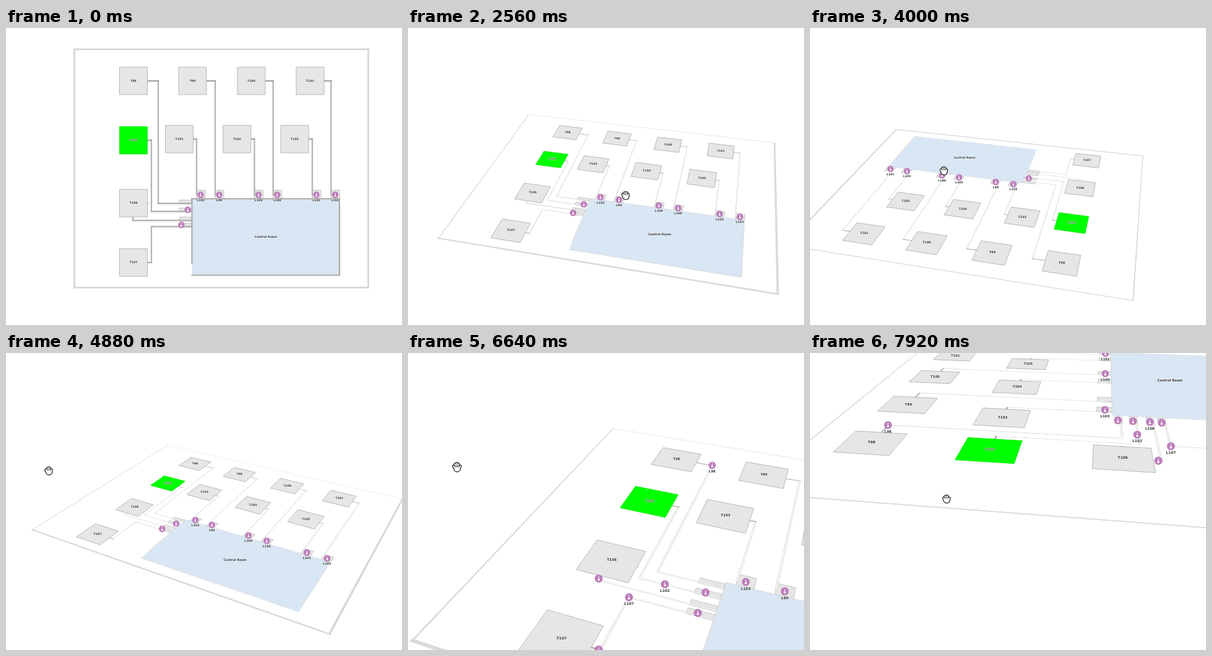
Recreate the animation shown at these times as an HTML page with a canvas. Size 640 by 480 pixels, loop 8 s.

```html
<!DOCTYPE html>
<html lang="en">
<head>
<meta charset="utf-8">
<title>Plan view</title>
<style>
html, body { margin: 0; width: 100%; height: 100%; overflow: hidden; background: #fff; }
canvas { display: block; }
</style>
</head>
<body>
<canvas id="stage" width="640" height="480"></canvas>
<script>
const g = document.getElementById('stage').getContext('2d');
const LOOP = 8000, STEP = 80, FOCAL = 893, MID_X = 320, MID_Y = 262;
const DETAIL = 640; // closer than this, the sensors along the pipes show

const mix = (a, b, k) => a + (b - a) * k;
const grey = v => `rgb(${v},${v},${v})`;

// Layout of the plan
const rooms = [], pipes = [], pads = [], sensors = [];

function addRoom(n, x, y, ...bends) {
  rooms.push({ name: 'T' + n, x, y });
  pipes.push([[x + 22.5, y], ...bends]);
}

function topRoom(n, x, y, bend) {
  addRoom(n, x, y, [bend, y], [bend, 270]);
  pads.push([bend, 262, 14, 14]);
  sensors.push({ label: 'L' + n, x: bend + 6.6, y: 269.5 });
}

function leftRoom(n, y, bend, port) {
  addRoom(n, 206, y, [bend, y], [bend, port], [300, port]);
  pads.push([280, port - 5.5, 20, 6.5]);
  sensors.push({ label: n === 106 ? 'L106' : '', x: 288, y: port - 2.7, port: true });
}

for (let i = 0; i < 3; i++) {
  topRoom(99 + i, 301.5 + 95 * i, 85.5, 338 + 93.7 * i);
  topRoom(103 + i, 280 + 93.3 * i, 179.5, 308 + 93.5 * i);
}
sensors.sort((a, b) => a.label < b.label ? -1 : 1);
for (const [label, x, y] of [['L98', 246, 85], ['L102', 256, 296], ['L107', 235, 321], ['', 205, 309], ['', 234, 379]])
  sensors.push({ label, x, y, detail: true });
leftRoom(102, 181.5, 235, 296.5);
leftRoom(107, 379, 235, 321);
leftRoom(106, 283, 205, 311);
leftRoom(98, 85.5, 246, 283.5);

// Camera and hand at time t, from the drags and the zoom
let cam;
function pose(t) {
  const ramp = (a, b) => Math.min(1, Math.max(0, (t - a) / (b - a)));
  const enter = ramp(80, 800), up = ramp(880, 1250), down = ramp(1250, 1680);
  const tilt = ramp(1840, 2600), turn = ramp(2640, 4880) ** 1.48, settle = ramp(4880, 5360);
  const nudge = ramp(5800, 6160), zoom = 1 - (1 - ramp(6300, 6960)) ** 1.56;
  const reach = ramp(6980, 7160), spin = ramp(7160, 7920);

  const yaw = (14 * tilt + 375.6 * turn + 4.8 * settle - 12.5 * nudge - 103.1 * spin) * Math.PI / 180;
  const pitch = (90 - 57 * tilt - 3 * turn + 3 * settle - 3.25 * spin) * Math.PI / 180;
  cam = {
    x: 320 - 1.2 * down - 211.4 * zoom,
    y: 262 + 11 * up - 24 * down - 38 * zoom ** 0.75,
    dist: mix(FOCAL, 340, zoom),
    c: Math.cos(yaw), s: Math.sin(yaw), pc: Math.cos(pitch), ps: Math.sin(pitch), tilt
  };
  return {
    x: 16 + 345 * enter + 1.5 * down - 11.5 * tilt - 282 * turn + 10 * nudge + 63 * reach + 78.5 * spin,
    y: 22 + 292 * enter - 11 * up + 24 * down - 60 * tilt - 77 * turn - 4 * settle - nudge + 27 * reach + 23.5 * spin,
    open: up === 0 || (nudge === 1 && spin === 0)
  };
}

function project(x, y) {
  const dx = x - cam.x, dy = y - cam.y;
  const u = dx * cam.c - dy * cam.s, v = dx * cam.s + dy * cam.c;
  const k = FOCAL / Math.max(15, cam.dist - v * cam.pc);
  return [MID_X + u * k, MID_Y + v * cam.ps * k, k ** 0.3];
}

function poly(points, fill, edge) {
  g.beginPath();
  for (const p of points) g.lineTo(...project(...p).slice(0, 2));
  g.closePath();
  g.fillStyle = fill;
  g.fill();
  if (edge) { g.strokeStyle = edge; g.lineWidth = 0.7; g.stroke(); }
}

function rect(x, y, w, h, fill, edge) {
  poly([[x, y], [x + w, y], [x + w, y + h], [x, y + h]], fill, edge);
}

// A line of real width lying on the ground
function band(points, width, color) {
  for (let i = 1; i < points.length; i++) {
    const [ax, ay] = points[i - 1], [bx, by] = points[i];
    const half = width / 2 / Math.hypot(bx - ax, by - ay);
    const ex = (bx - ax) * half, ey = (by - ay) * half;
    poly([[ax - ex - ey, ay - ey + ex], [bx + ex - ey, by + ey + ex],
          [bx + ex + ey, by + ey - ex], [ax - ex + ey, ay - ey - ex]], color);
  }
}

function label(text, x, y, k, color = '#333', halo = 'rgba(255,255,255,.6)') {
  g.font = `bold ${4.7 * k}px "DejaVu Sans", sans-serif`;
  g.lineWidth = 1;
  g.strokeStyle = halo;
  g.strokeText(text, x, y);
  g.fillStyle = color;
  g.fillText(text, x, y);
}

function dot(x, y, r, color) {
  g.fillStyle = color;
  g.beginPath();
  g.arc(x, y, r, 0, 7);
  g.fill();
}

// Sensors that would crowd an earlier one are left out
function drawSensors() {
  const shown = [], near = cam.dist < DETAIL;
  for (const s of sensors) {
    if (s.detail && !near) continue;
    const fan = s.port && !near ? (307.5 - s.y) * 0.42 : 0;
    const [x, y, k] = project(s.x + fan, s.y);
    if (shown.some(p => Math.hypot(p[0] - x, p[1] - y) < 18)) continue;
    shown.push([x, y]);
    dot(x, y, 5.2 * k, '#bd7dba');
    g.fillStyle = '#fff';
    g.fillRect(x - 0.5, y - 3 * k, 1, 4 * k);
    dot(x, y + 1.6 * k, 1.4 * k, '#fff');
    label(s.label, x, y + 8.9 * k, k);
  }
}

function drawHand({ x, y, open }) {
  g.save();
  g.translate(x, y);
  g.scale(1.25, 1.25);
  g.lineCap = 'round';
  const reach = open ? 5.4 : 3.6;
  for (const [color, grow] of [['#111', 0.9], ['#fff', 0]]) {
    g.strokeStyle = g.fillStyle = color;
    g.lineWidth = 1.7 + 2 * grow;
    g.beginPath();
    for (let i = -2; i < 3; i++) {
      g.moveTo(i * (open ? 2.3 : 1.9), i * i * (open ? 0.9 : 0.7) - reach);
      g.lineTo(i + 0.4, 2.5);
    }
    g.stroke();
    g.beginPath();
    g.ellipse(0.4, 2, 3.7 + grow, 3.2 + grow, 0, 0, 7);
    g.fill();
  }
  g.strokeStyle = '#111';
  g.lineWidth = 0.6;
  g.beginPath();
  for (let fx = -1.2; fx < 3; fx += 1.7) {
    g.moveTo(fx, -2.6);
    g.lineTo(fx, -0.3);
  }
  g.stroke();
  g.restore();
}

function draw(t) {
  const hand = pose(t), flat = 1 - cam.tilt;
  g.fillStyle = '#fff';
  g.fillRect(0, 0, 640, 480);

  band([[110.5, 419.5], [110.5, 34.5], [585.5, 34.5]], mix(1.4, 3, flat), '#d9d9d9');
  band([[585.5, 34.5], [585.5, 419.5], [110.5, 419.5]], 3, '#d9d9d9');

  for (const p of pads) rect(...p, '#e6e6e6', '#b4b4b4');
  for (const p of pipes) {
    band(p, mix(1.7, 2.3, flat), grey(mix(208, 180, flat)));
    band(p, 1, `rgba(250,250,250,${cam.tilt})`);
    band(p.slice(0, 2), mix(1.2, 1.8, flat), '#a8a8a8');
  }

  rect(301, 276, 238, 123.5, '#d9e6f4');
  band([[300.5, 381], [300.5, 276], [539, 276], [539, 399.5], [300.5, 399.5]],
    mix(0.8, 2.2, flat), grey(mix(216, 172, flat)));

  for (const { name, x, y } of rooms) {
    const active = name === 'T102';
    rect(x - 22.5, y - 22.3, 45, 44.6, active ? '#0f0' : '#e6e6e6', active ? '#0d0' : '#a0a0a0');
  }

  g.textAlign = 'center';
  g.textBaseline = 'middle';
  g.lineJoin = 'round';
  for (const { name, x, y } of rooms)
    label(name, ...project(x, y), ...(name === 'T102' ? ['#4a804a', 'rgba(200,225,200,.75)'] : []));
  label('Control Room', ...project(420, 338));
  drawSensors();

  if (t >= 80) drawHand(hand);
}

function tick(now) {
  draw(Math.floor(now % LOOP / STEP) * STEP);
  requestAnimationFrame(tick);
}
draw(0);
requestAnimationFrame(tick);
</script>
</body>
</html>
```
